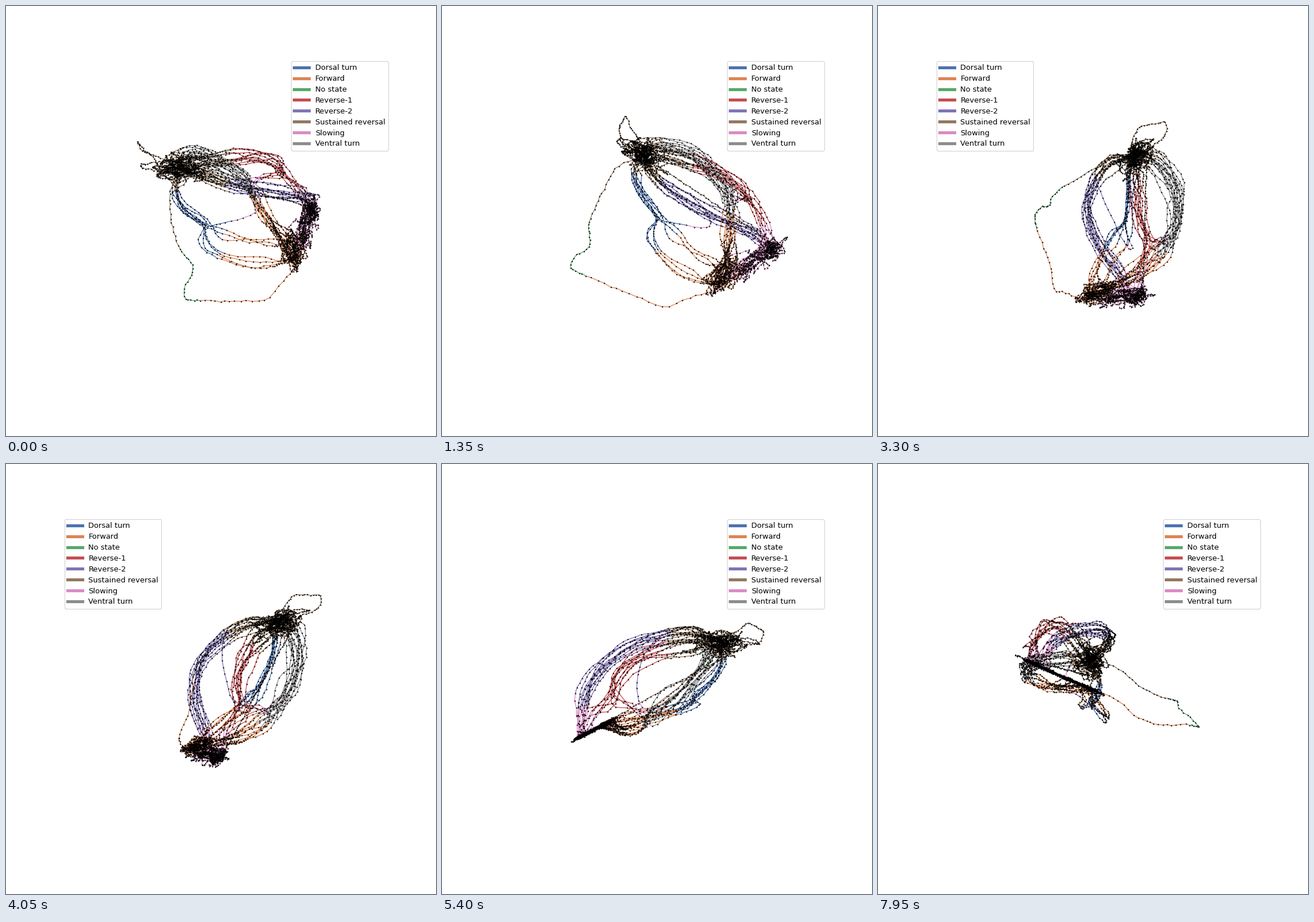
Write a matplotlib script that moves like this. It is 748 px wide and 748 px high and loops after 8 s.

```python
import numpy as np
import matplotlib.pyplot as plt
from matplotlib.animation import FuncAnimation
from matplotlib.collections import LineCollection
from matplotlib.lines import Line2D

STATES = ["Dorsal turn", "Forward", "No state", "Reverse-1",
          "Reverse-2", "Sustained reversal", "Slowing", "Ventral turn"]
COLORS = np.array(["#4C72B0", "#DD8452", "#55A868", "#C44E52",
                   "#8172B3", "#937860", "#DA8BC3", "#8C8C8C"])
DORSAL, FORWARD, NONE, REV1, REV2, SUSTAINED, SLOWING, VENTRAL = range(8)
STEP = np.array([9.0, 12.0, 6.0, 12.0, 11.0, 8.0, 12.0, 11.0])  # dot spacing in px
WANDER_STEP = 4.2

# Waypoints: state, right, towards viewer, up (px at the centre of the stage)
REVERSE_2 = [(SLOWING, 144, -86, -10), (REV2, 125, -43, 23), (REV2, 71, 0, 56),
             (REV2, -4, 9, 78), (SUSTAINED, -50, -4, 88)]
REVERSE_1 = [(REV1, 91, -111, 34), (REV1, 76, -92, 64), (REV1, 42, -76, 82),
             (REV1, 4, -59, 89), (SUSTAINED, -50, -42, 88)]
VENTRAL_TURN = [(SUSTAINED, -82, -66, 85), (VENTRAL, -45, -119, 60),
                (VENTRAL, -8, -134, 29), (VENTRAL, 21, -133, 4)]
VENTRAL_EXIT = [(VENTRAL, 41, -119, -22), (FORWARD, 69, -83, -54)]
DORSAL_TURN = [(SUSTAINED, -95, -14, 48), (DORSAL, -86, -17, 14),
               (DORSAL, -46, -24, -27)]
DORSAL_EXIT = [(DORSAL, -6, -34, -53), (FORWARD, 39, -31, -63),
               (FORWARD, 80, -28, -71)]
DORSAL_LOW = [(DORSAL, -54, -8, -44), (DORSAL, -32, 3, -66),
              (FORWARD, 39, 1, -85), (FORWARD, 78, -6, -88)]
SHORTCUT = [(DORSAL, -5, -42, -30), (SLOWING, 19, -57, -33),
            (SLOWING, 46, -57, -13), (REV2, 37, -16, 58)]
EXCURSION = [(SUSTAINED, -103, 15, 75), (SUSTAINED, -101, 62, 30),
             (SUSTAINED, -87, 102, 4), (NONE, -66, 122, -17),
             (NONE, -64, 124, -29), (NONE, -77, 147, -46),
             (NONE, -76, 158, -62), (NONE, -52, 146, -73),
             (FORWARD, 4, 100, -104), (FORWARD, 64, 65, -122),
             (FORWARD, 90, 38, -105), (FORWARD, 108, 10, -98)]
TAIL = [(SUSTAINED, -122, -12, 98), (SUSTAINED, -136, -18, 115),
        (SUSTAINED, -149, -32, 117), (SUSTAINED, -162, -58, 120),
        (SUSTAINED, -155, -62, 102), (SUSTAINED, -122, -50, 92)]

HUB = (-90, -28, 82)
RUN = (111, -28, -80)
REST = (143, -115, -47)

rng = np.random.default_rng(12)
nodes, node_state, node_step = [], [], []


def add(point, state, step=None):
    nodes.append(np.array(point, float))
    node_state.append(state)
    node_step.append(step or STEP[state])


def leg(waypoints, spread):
    shared = rng.normal(size=3)
    for state, *point in waypoints:
        noise = 0.8 * shared + 0.45 * rng.normal(size=3)
        add(point + spread * noise, state)


def wander(center, spread, count, state, step=WANDER_STEP, flat=False):
    center, spread = np.array(center), np.array(spread)
    off = spread * rng.normal(size=3)
    for _ in range(count):
        off = 0.7 * off + 0.7 * spread * rng.normal(size=3)
        p = center + off
        if flat:  # the run and rest clusters lie on one tilted plane
            p[2] = (-56 - p[0] - p[1]) / 1.73 + rng.normal(0, 1.5)
        add(p, state, step)


def hub():
    wander(HUB, (20, 12, 10), rng.integers(4, 9), SUSTAINED)


def run_and_rest():
    wander(RUN, (11, 18, 0), rng.integers(3, 8), FORWARD, flat=True)
    wander((128, -68, 0), (9, 17, 0), 2, SLOWING, 7, flat=True)
    wander(REST, (7, 9, 0), rng.integers(2, 8), SLOWING, 3.5, flat=True)


def build():
    run_and_rest()
    skip_rest = False
    for i, turn in enumerate("VDSVDVTSVDLVGDVSVDVSDVDV"):
        if turn != "L" and not skip_rest:
            if i % 5 in (1, 3):
                add((126, -116, -8) + rng.normal(0, 6, 3), SLOWING)
                leg(REVERSE_1, 9)
            else:
                leg(REVERSE_2, 8)
        hub()
        skip_rest = False
        if turn == "T":
            for state, *point in TAIL:
                add(point, state, 5.0)
            hub()
        if turn == "G":
            leg(EXCURSION, 0.8)
        elif turn == "D":
            leg(DORSAL_TURN, 6)
            leg(DORSAL_LOW if i % 3 == 1 else DORSAL_EXIT, 8)
        elif turn == "L":
            leg(DORSAL_TURN + SHORTCUT, 2)
            leg(REVERSE_2[3:], 5)
            hub()
            leg(VENTRAL_TURN + VENTRAL_EXIT, 9)
        else:
            leg(VENTRAL_TURN, 10)
            if turn == "S":
                add((52, -126, 17) + rng.normal(0, 6, 3), SLOWING)
                leg(REVERSE_1, 9)
                skip_rest = True
            else:
                leg(VENTRAL_EXIT, 9)
        if not skip_rest:
            run_and_rest()


def smooth_path():
    """Hermite curve through the nodes, cut into short straight steps."""
    p = np.array(nodes)
    t = np.r_[0, np.cumsum(np.sqrt(np.linalg.norm(np.diff(p, axis=0), axis=1)) + 0.1)]
    slope = np.gradient(p, t, axis=0)
    points, states = [], []
    for k in range(len(p) - 1):
        h = t[k + 1] - t[k]
        length = np.linalg.norm(p[k + 1] - p[k])
        n = max(1, round(length / node_step[k + 1]))
        s = ((np.arange(n) + rng.uniform(0, 0.4, n)) / n)[:, None]
        points.append((1 + 2 * s) * (1 - s) ** 2 * p[k]
                      + s * (1 - s) ** 2 * h * slope[k]
                      + s ** 2 * (3 - 2 * s) * p[k + 1]
                      + s ** 2 * (s - 1) * h * slope[k + 1])
        states += [node_state[k + 1]] * n
    points = np.concatenate(points)
    return points + rng.normal(0, 0.7, points.shape), np.array(states)


def project(points, angle, elevation=np.radians(30), distance=3113):
    right, front, up = points.T
    x = right * np.cos(angle) - front * np.sin(angle)
    depth = front * np.cos(angle) + right * np.sin(angle)
    y = up * np.cos(elevation) - depth * np.sin(elevation)
    near = depth * np.cos(elevation) + up * np.sin(elevation)
    scale = distance / (distance - near)
    return np.column_stack([x * scale, y * scale])


build()
path, path_state = smooth_path()

fig = plt.figure(figsize=(8, 8), dpi=93.5, facecolor="white")
ax = fig.add_axes([0.1275, 0.11, 0.77, 0.77])
ax.set_xlim(-295.8, 280.2)
ax.set_ylim(-295.8, 280.2)
ax.axis("off")

lines = LineCollection([], colors=COLORS[path_state[:-1]], linewidths=1.0, zorder=2)
ax.add_collection(lines, autolim=False)
dots, = ax.plot([], [], "o", color="black", markersize=1.75, markeredgewidth=0, zorder=3)
legend = ax.legend([Line2D([], [], color=c, lw=4) for c in COLORS], STATES,
                   loc="upper right", labelspacing=0.45,
                   prop={"family": "DejaVu Sans", "size": 10})
legend.set_zorder(5)


def update(i):
    degrees = 5 * (i // 3)
    xy = project(path, np.radians(degrees))
    lines.set_segments(np.stack([xy[:-1], xy[1:]], axis=1))
    dots.set_data(xy[:, 0], xy[:, 1])
    # the legend makes room while the tail passes its corner
    legend.set_loc("upper left" if 110 <= degrees < 150 else "upper right")
    return lines, dots, legend


anim = FuncAnimation(fig, update, frames=160, interval=50, repeat=True,
                     repeat_delay=0, blit=False)
plt.show()
```
